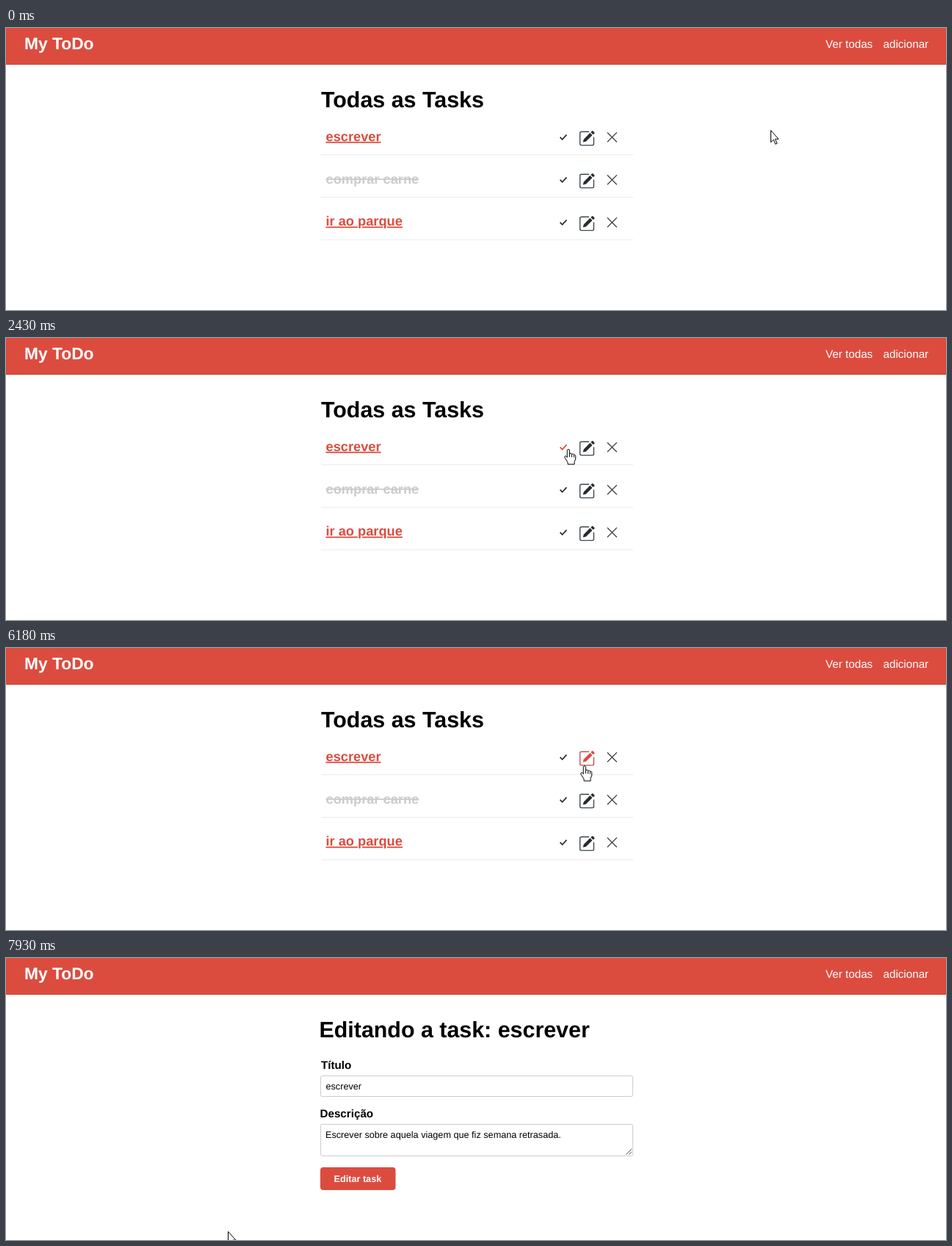
Recreate the animation shown at these times as an HTML page. Size 1280 by 384 pixels, loop 8000 ms.

```html
<!DOCTYPE html>
<html lang="pt-BR">
<head>
<meta charset="utf-8">
<title>My ToDo</title>
<style>
  html, body { margin: 0; width: 100%; height: 100%; overflow: hidden; background: #fff; }
  svg { display: block; width: 100%; height: 100%; }
  text { font-family: "Liberation Sans", Arial, sans-serif; font-size: 15.2px; text-rendering: geometricPrecision; white-space: pre; }
  .bold { font-weight: bold; }
  .brand { font-size: 22.8px; }
  .heading { font-size: 30.4px; }
  .task { font-size: 18.24px; font-weight: bold; fill: #db4c3f; text-decoration: underline; }
  .task.done { fill: #ccc; text-decoration: line-through; }
  .small { font-size: 12.67px; }
  .icon { color: #2b2b2b; --edge: #3a4a52; }
  .icon.hover { color: #db4c3f; --edge: #c45058; }
  .field { fill: #fff; stroke: #ccc; }
  .hidden { display: none; }
</style>
</head>
<body>
<svg viewBox="0 0 1280 384" preserveAspectRatio="none">
  <defs>
    <path id="check" d="M754.5 148.6L757.5 151.8L763.4 145.4" fill="none" stroke="currentColor" stroke-width="1.7"/>
    <g id="edit">
      <path d="M794 141.2H783.5Q781.6 141.2 781.6 143V157.8Q781.6 159.6 783.5 159.6H798.6Q800.4 159.6 800.4 157.8V148.5" fill="none" stroke="var(--edge)" stroke-width="1.4"/>
      <path d="M785.6 155.6L786.7 151.4L795.3 142.8L798.4 145.9L789.8 154.5ZM796.2 141.9L797.6 140.5Q798.6 139.7 799.6 140.6L801.2 142.2Q802 143.1 801.1 144.1L799.4 145Z" fill="currentColor"/>
    </g>
    <path id="cross" d="M818.8 142.2L831.8 155.2M831.8 142.2L818.8 155.2" fill="none" stroke="#3a4246" stroke-width="1.25"/>
  </defs>

  <rect width="1280" height="384" fill="#fff"/>
  <rect width="1280" height="50" fill="#db4c3f"/>
  <rect y="49" width="1280" height="1" fill="#c2463b"/>
  <g fill="#fff">
    <text class="bold brand" x="25" y="29.3">My ToDo</text>
    <text x="1116" y="26.6">Ver todas</text>
    <text x="1194.5" y="26.6">adicionar</text>
  </g>

  <g id="list">
    <text class="bold heading" x="429" y="107.8">Todas as Tasks</text>
  </g>

  <g id="form" class="hidden">
    <text class="bold heading" x="426.5" y="107.8">Editando a task: escrever</text>
    <text class="bold" x="429" y="151.4">Título</text>
    <rect class="field" x="428.5" y="160.5" width="425" height="28" rx="2"/>
    <text class="small" x="435.5" y="178.8">escrever</text>
    <text class="bold" x="427.5" y="217.4">Descrição</text>
    <rect class="field" x="428.5" y="226.5" width="425" height="43" rx="2"/>
    <text class="small" x="435" y="245">Escrever sobre aquela viagem que fiz semana retrasada.</text>
    <path d="M844.5 267.5L852 260M848.5 267.5L852 264" stroke="#555"/>
    <rect x="428" y="285" width="102.5" height="31" rx="4" fill="#db4c3f"/>
    <text class="bold small" x="446.5" y="304.6" fill="#fff">Editar task</text>
  </g>

  <g id="pointer">
    <circle id="click" cx="-1" cy=".5" r="12" fill="#ff0" fill-opacity=".47"/>
    <path id="arrow" d="M.5 .5V16.6L4.2 13.1L6.8 19.2L9 18.2L6.4 12.2H11Z" fill="#fff" stroke="#000"/>
    <path id="hand" d="M-1.8 1.2Q-1.8 -.4 -.2 -.4T1.4 1.2V6Q1.8 5 3 5T4.5 6.5Q5 5.7 6 5.8T7.4 7.3Q8 6.7 8.8 7T9.7 8.6V13L8 16.5V20H-1V17.4L-5 11.2Q-5.8 9.3 -4.6 8.7T-1.8 10.6ZM1.4 6V10M4.5 6.5V10.3M7.4 7.3V10.6" fill="#fff" stroke="#000"/>
    <path id="ibeam" d="M-2.5 -6.5H.5M1.5 -6.5H4.5M1 -6V7M-2.5 7.5H.5M1.5 7.5H4.5" fill="none" stroke="#333" stroke-width="1.2"/>
  </g>
</svg>
<script>
const LOOP = 8000;
const $ = id => document.getElementById(id);
const between = (v, a, b) => v >= a && v < b;
const show = (id, on) => $(id).classList.toggle('hidden', !on);

['escrever', 'comprar carne', 'ir ao parque'].forEach((name, i) => {
  $('list').insertAdjacentHTML('beforeend', `
    <g transform="translate(0 ${58 * i})">
      <text class="task${i === 1 ? ' done' : ''}" x="435.5" y="${153.8 - i * .2}">${name}</text>
      <use class="icon" href="#check"/><use class="icon" href="#edit"/><use href="#cross"/>
      <rect x="429" y="172" width="425" height="1" fill="#ececec"/>
    </g>`);
});
const task = document.querySelector('.task');
const [checkIcon, editIcon] = document.querySelectorAll('.icon');

// Pointer positions [time, x, y], each held until the next
const stops = [[0, 1041, 139]];
const SWEEP = 12;
for (let i = 1; i <= SWEEP; i++) {
  const k = i / SWEEP, u = k * k * (3 - 2 * k);
  const bend = (a, b, c) => (1 - u) ** 2 * a + 2 * u * (1 - u) * b + u * u * c;
  stops.push([70 + (i - 1) * 730 / (SWEEP - 1), bend(1041, 886, 731), bend(139, 232, 150)]);
}
stops.push(
  [870, 737, 150], [940, 745, 151], [1005, 757, 151], [1075, 773, 151], [1140, 786, 151], [1210, 793, 151],
  [1470, 792, 151], [1550, 791, 151],
  [1800, 790, 152], [1865, 782, 152], [1925, 771, 152], [1990, 766, 152],
  [6040, 770, 154], [6110, 780, 158], [6180, 788, 161], [6400, 787, 161],
  [7390, 770, 165], [7455, 735, 174], [7520, 690, 186], [7590, 648, 198], [7660, 626, 191],
  [7870, 480, 275], [7930, 302, 372]
);
const clicks = [[2300, 2430], [5070, 5100], [6600, 6670]];

function draw(t) {
  const [, px, py] = stops.findLast(s => s[0] <= t + .01);
  const x = Math.round(px), y = Math.round(py);
  const onForm = t >= 7060;
  const onCheck = !onForm && between(x, 751, 769);
  const onEdit = !onForm && between(x, 780, 804) && y < 164;
  const loading = between(t, 3970, 4110) || between(t, 6930, 7060);
  const kind = onForm && between(y, 160, 189) ? 'ibeam'
    : (onCheck || onEdit) && !loading ? 'hand' : 'arrow';

  show('list', !onForm);
  show('form', onForm);
  for (const id of ['arrow', 'hand', 'ibeam']) show(id, id === kind);
  show('click', clicks.some(([a, b]) => between(t, a, b)));
  $('pointer').setAttribute('transform', `translate(${x} ${y})`);
  task.classList.toggle('done', between(t, 4110, 5650));
  checkIcon.classList.toggle('hover', onCheck && t < 5650);
  editIcon.classList.toggle('hover', onEdit);
}

const start = performance.now();
function tick() {
  draw((performance.now() - start) % LOOP);
  requestAnimationFrame(tick);
}
tick();
</script>
</body>
</html>
```
